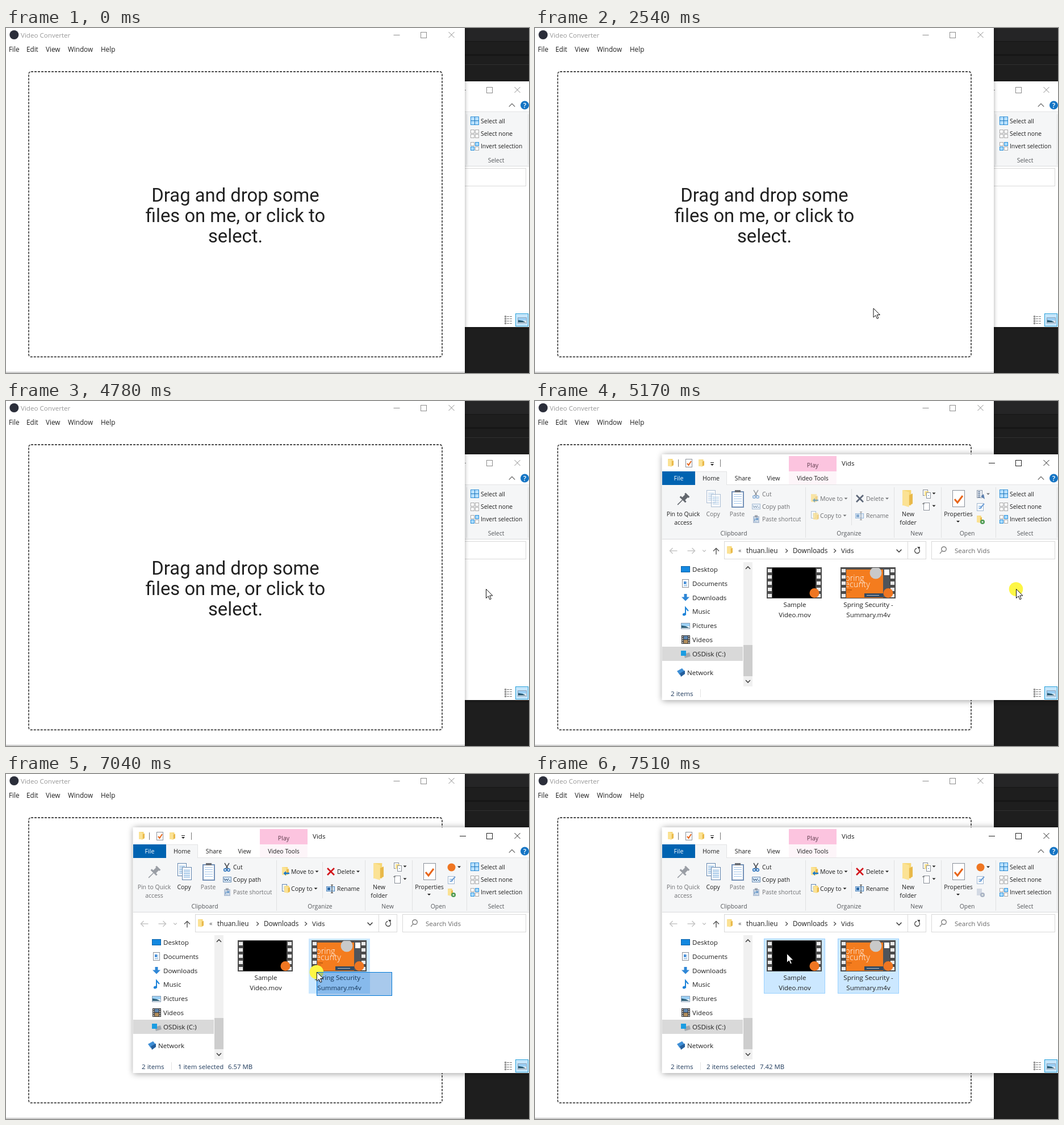
An HTML page with a canvas for the animation above (8 s loop, 921 by 608 pixels).

```html
<!DOCTYPE html>
<html lang="en">
<head>
<meta charset="utf-8">
<title>Video Converter</title>
<style>
html, body { margin: 0; width: 100%; height: 100%; overflow: hidden; background: #1e1e1e; }
canvas { display: block; width: 921px; height: 608px; }
</style>
</head>
<body>
<canvas id="stage" width="921" height="608"></canvas>
<script>
const stage = document.getElementById('stage').getContext('2d');
let c = stage;
const LOOP = 8000;
const UI = '"Open Sans", "Noto Sans", sans-serif';
const INK = '#1f1f1f', DIM = '#6f7073', BLUE = '#0078d7';

// ---------- drawing helpers ----------
function box(x, y, w, h, fill, edge) {
  if (fill) { c.fillStyle = fill; c.fillRect(x, y, w, h); }
  if (edge) { c.strokeStyle = edge; c.lineWidth = 1; c.strokeRect(x + .5, y + .5, w - 1, h - 1); }
}
function disc(x, y, r, fill) {
  c.fillStyle = fill; c.beginPath(); c.arc(x, y, r, 0, 7); c.fill();
}
function path(pts, x = 0, y = 0) {
  c.beginPath();
  for (let i = 0; i < pts.length; i += 2) c.lineTo(x + pts[i], y + pts[i + 1]);
}
function line(color, width, ...pts) {
  path(pts); c.strokeStyle = color; c.lineWidth = width; c.stroke();
}
function poly(color, ...pts) {
  path(pts); c.fillStyle = color; c.fill();
}
function text(s, x, y, size = 10.3, color = INK, align = 'left', font = UI, weight = 400) {
  c.font = `${weight} ${size}px ${font}`;
  c.textAlign = align; c.fillStyle = color; c.fillText(s, x, y);
}
const mid = (s, x, y, size, color) => text(s, x, y, size, color, 'center');
const caret = (x, y, color = INK) => poly(color, x - 3, y - 1.5, x + 3, y - 1.5, x, y + 1.5);
function chevron(x, y, dx, dy, color, w = 1.3) {
  line(color, w, x - dx - 2 * dy, y - dy - 2 * dx, x + dx, y + dy, x - dx + 2 * dy, y - dy + 2 * dx);
}
function faded(on, draw) {
  c.save(); if (!on) c.globalAlpha = .5;
  draw(); c.restore();
}
function folder(x, y, w, h) {
  box(x, y, w * .85, h * .9, '#f7d774');
  poly('#e9b94a', x + w * .65, y + h * .3, x + w, y + h * .2, x + w, y + h * .8, x + w * .65, y + h * .9);
  poly('#fbe294', x, y, x + w * .65, y + h * .12, x + w * .65, y + h, x, y + h * .88);
}
function page(x, y, w, h, rows = 0, edge = '#8a9099') {
  box(x, y, w, h, '#fff', edge);
  for (let i = 0; i < rows; i++) box(x + 3, y + 5 + i * 3, w - 6, 1, '#5b9bd5');
}
function controls(y, [a, b, d], color) {
  line(color, 1, a - 5.5, y + .5, a + 5.5, y + .5);
  box(b - 5, y - 5, 11, 11, null, color);
  line(color, 1, d - 5, y - 5, d + 5, y + 5);
  line(color, 1, d + 5, y - 5, d - 5, y + 5);
}
function windowBox(x, y, w, h, blur, alpha) {
  c.save(); c.shadowColor = `rgba(0,0,0,${alpha})`; c.shadowBlur = blur; c.shadowOffsetY = 1;
  box(x, y, w, h, '#fff'); c.restore();
}

// ---------- converter window ----------
function desktop() {
  box(0, 0, 921, 608, '#1e1e1e');
  box(808, 0, 113, 23, '#252526');
  box(808, 23, 113, 1, '#151515');
  box(808, 46, 113, 3, '#161616');
  box(808, 64, 113, 1, '#303030');
}
function converter() {
  windowBox(-20, -20, 828, 627, 7, .35);
  box(0, 606, 808, 1, '#b4b4b4');
  box(0, 607, 808, 1, '#e4e4e4');
  disc(14.3, 12, 8, '#2b2e3a');
  text('Video Converter', 26, 17, 11.6, '#989898');
  controls(12, [688, 735, 784.5], '#8d8d8d');
  [['File', 5], ['Edit', 36], ['View', 70], ['Window', 109], ['Help', 167]]
    .forEach(([s, x]) => text(s, x, 42, 11.7));
  c.save();
  c.strokeStyle = '#4c4c4c'; c.lineWidth = 1.8; c.setLineDash([4, 2]);
  c.beginPath(); c.roundRect(40, 77, 728, 502.5, 4); c.stroke();
  c.restore();
  ['Drag and drop some', 'files on me, or click to', 'select.']
    .forEach((s, i) => text(s, 404, 305.5 + i * 36, 32.8, '#212121', 'center', 'Roboto, sans-serif'));
}

// ---------- ribbon ----------
function quickBar() {
  folder(234, 102, 10, 14);
  box(252, 103, 1, 13, '#777');
  page(265, 102, 12, 15);
  line('#e8651a', 2, 268, 110, 270.5, 113, 275, 106);
  folder(288, 103, 10, 13);
  box(309, 108, 6, 1, INK); caret(312, 112.5);
  box(326, 103, 1, 13, '#777');
}
function clipboardIcon(x, y, w, h) {
  box(x, y + 2, w, h - 2, '#7592b8');
  box(x + 2, y + 4, w - 4, h - 6, '#fff');
  box(x + w * .27, y, w * .46, 4, '#6b6f76');
  for (let i = 0; i < Math.floor(h / 6); i++) box(x + 4, y + 7 + i * 4, w - 8, 1, '#9fc3e8');
}
function clipboardGroup(sel) {
  const on = sel ? INK : DIM, off = sel ? DIM : INK;
  const steel = sel ? '#9a9ea5' : '#63676e';
  c.save(); c.translate(261, 173); c.rotate(Math.PI / 4);
  box(-5, -11, 10, 3, steel); box(-3.5, -9, 7, 9, steel); box(-7, -1, 14, 3, steel);
  line(steel, 1.5, 0, 2, 0, 14);
  c.restore();
  mid('Pin to Quick', 261, 203, 10.5, off); mid('access', 261, 217.5, 10.5, off);
  faded(sel, () => { page(302, 157, 16, 23, 5, '#5f83ad'); page(310, 164, 17, 23, 5, '#5f83ad'); });
  mid('Copy', 313.5, 203, 10.4, on);
  clipboardIcon(346, 157, 22, 31);
  mid('Paste', 356, 203, 10.4, DIM);
  faded(sel, () => {
    line('#4a4f57', 1.5, 385, 157, 391, 167); line('#4a4f57', 1.5, 393, 157, 387, 167);
    c.strokeStyle = '#2a72bd'; c.lineWidth = 1.6;
    for (const x of [386, 392]) { c.beginPath(); c.arc(x, 169, 2.3, 0, 7); c.stroke(); }
    box(382, 181, 15, 10, '#d7e8f8', '#6f8fb3');
    line('#24466d', 1, 384, 184, 386, 188, 388, 185, 390, 188, 392, 184);
    box(393, 187, 2, 1, '#24466d');
  });
  text('Cut', 400, 168, 10.4, on);
  text('Copy path', 400, 190, 10.4, on);
  faded(false, () => {
    clipboardIcon(384, 201, 11, 14);
    line('#1664b0', 1.5, 387, 212, 387, 208, 392, 208); poly('#1664b0', 390, 205, 394, 208, 390, 211);
  });
  text('Paste shortcut', 400, 212, 10.2, DIM);
}
function organizeGroup(sel) {
  const on = sel ? INK : DIM;
  faded(sel, () => {
    folder(486, 164, 12, 15);
    line('#1979ca', 2.5, 499, 175, 492, 175); poly('#1979ca', 493, 171, 488.5, 175, 493, 179);
    page(486, 194, 9, 13, 2, '#5f83ad'); folder(490, 197, 10, 13);
  });
  text('Move to', 502, 176, 10.6, on); caret(547.5, 172, on);
  text('Copy to', 502, 206, 10.6, on); caret(545.5, 202, on);
  const x = sel ? '#d3131b' : '#5d6778';
  line(x, 2.6, 566, 166, 578, 178); line(x, 2.6, 578, 166, 566, 178);
  text('Delete', 583, 176, 10.4, on); caret(620, 172, on);
  faded(sel, () => {
    box(564, 198, 15, 9, '#cfe4f7', '#4b83bd'); box(566, 200, 5, 5, '#2c6aa8');
    line('#333', 1, 572, 195.5, 576, 195.5); line('#333', 1, 574, 196, 574, 209); line('#333', 1, 572, 209.5, 576, 209.5);
  });
  text('Rename', 583, 206, 10.4, on);
}
function newGroup() {
  folder(647, 157, 18, 30);
  mid('New', 657, 203, 10.6); mid('folder', 657, 217.5, 10.6);
  page(683, 156, 9, 11); folder(686, 159, 8, 9); page(689, 161, 8, 11, 1);
  caret(702.5, 163);
  page(684, 179, 11, 14); line('#555', 1, 682, 181, 686, 181);
  caret(702.5, 185);
}
function openGroup(sel) {
  page(735, 157, 22, 30);
  line('#e8651a', 3, 739, 173, 744, 179, 753, 167);
  mid('Properties', 745.5, 203, 10.5); caret(745, 212.5);
  if (sel) disc(784.5, 164.5, 7, '#ef7622');
  else {
    box(778, 157, 10, 14, '#eef1f5', '#8b97a8');
    for (let i = 0; i < 4; i++) box(780, 159 + i * 3, 4, 2, '#7f93ad');
    poly('#5b7fae', 785, 168, 790, 164, 792, 173);
  }
  caret(798, 164, sel ? INK : DIM);
  page(778, 180, 12, 14, 2, '#9fb6d0'); line('#6f9fd6', 2, 783, 190, 791, 181);
  const grey = sel > 1;
  if (grey) box(778, 202, 9, 12, '#d3d9e4'); else folder(778, 202, 9, 13);
  disc(788, 213, 4, grey ? '#a9b3c4' : '#4d9b53'); disc(788, 213, 1.5, '#e8eee8');
}
function grid(x, y, marks) {
  for (let i = 0; i < 4; i++) {
    const on = marks[i] === '1';
    box(x + i % 2 * 8, y + (i >> 1) * 8, 7, 7, on ? '#a9dcff' : '#fff', on ? '#2b8fd9' : '#a8a8a8');
  }
}
function selectGroup() {
  box(818, 156, 15, 15, '#b9e1ff', '#2b8fd9');
  box(825, 156, 1, 15, '#1c77bd'); box(818, 163, 15, 1, '#1c77bd');
  grid(818, 179, '0000');
  grid(818, 201, '0110');
  text('Select all', 836, 168, 10.5);
  text('Select none', 836, 190, 10.4);
  text('Invert selection', 836, 212, 10.3);
}
function ribbon(sel) {
  box(447, 97, 84, 51, '#fdf5f9'); box(447, 97, 84, 27, '#fcc4df');
  mid('Play', 489, 116.5, 10.6, '#5c3a4b'); mid('Video Tools', 489, 140, 10.5);
  text('Vids', 540, 114, 11.6);
  box(224, 148, 697, 96, '#f5f6f7');
  box(224, 147, 697, 1, '#e3e4e5'); box(224, 243, 697, 1, '#dadbdc');
  box(224, 124, 58, 24, '#0063b1');
  box(282, 124, 56, 25, '#f5f6f7');
  box(282, 124, 56, 1, '#e3e4e5'); box(337, 124, 1, 24, '#e3e4e5');
  mid('File', 253, 140, 10.6, '#fff'); mid('Home', 310, 140, 10.6);
  mid('Share', 366, 140, 10.6); mid('View', 420, 140, 10.6);
  chevron(891, 136, 0, -2.6, '#666');
  disc(913.5, 136, 7.5, '#1474c4');
  text('?', 913.5, 140.5, 12, '#fff', 'center', UI, 600);
  for (const x of [476, 632, 715, 811, 919]) box(x, 152, 1, 89, '#e0e1e2');
  box(557, 155, 1, 64, '#e0e1e2');
  [['Clipboard', 350], ['Organize', 553], ['New', 672], ['Open', 761], ['Select', 863]]
    .forEach(([s, x]) => mid(s, x, 237, 10.4, '#54575b'));
  quickBar(); clipboardGroup(sel); organizeGroup(sel); newGroup(); openGroup(sel); selectGroup();
}

// ---------- explorer body ----------
function arrow(x, y, dx, dy, color) {
  const s = dy ? 5.5 : 6.5, k = 5, ax = x + dx * s, ay = y + dy * s;
  line(color, 1.4, x - dx * s, y - dy * s, ax, ay);
  line(color, 1.4, ax - k * (dx + dy), ay - k * (dy + dx), ax, ay, ax - k * (dx - dy), ay - k * (dy - dx));
}
function addressBar() {
  arrow(244, 264, -1, 0, '#c2c2c2'); arrow(275, 264, 1, 0, '#c2c2c2');
  chevron(298, 264, 0, 1.4, '#bbb'); arrow(319, 265, 0, -1, '#555');
  box(333, 247, 356, 32, '#fff', '#d9d9d9'); box(656, 247, 1, 32, '#d9d9d9');
  folder(338, 256, 10, 14);
  text('«', 358, 267, 11, '#555');
  text('thuan.lieu', 372, 267.5, 11.8); chevron(443, 264, 1.7, 0, '#444');
  text('Downloads', 454, 267.5, 11.8); chevron(528, 264, 1.7, 0, '#444');
  text('Vids', 539, 267.5, 11.6);
  chevron(641, 264, 0, 2.2, '#333', 1.5);
  c.strokeStyle = '#444'; c.lineWidth = 1.4; c.beginPath(); c.arc(673, 264, 4.3, -.6, 4.5); c.stroke();
  poly('#444', 673, 257, 678, 257, 677, 262);
  box(698, 247, 218, 32, '#fff', '#d9d9d9');
  c.strokeStyle = '#666'; c.lineWidth = 1.2; c.beginPath(); c.arc(720, 261, 4.2, 0, 7); c.stroke();
  line('#666', 1.2, 717, 264, 713, 269);
  text('Search Vids', 739, 268, 11.6, '#6b6b6b');
}
function picture(x, y, w, h) {
  box(x, y, w, h, '#fff', '#8aa0b8');
  box(x + 1, y + 1, w - 2, h * .45, '#9cd0f5');
  poly('#2f6079', x + 1, y + h * .4, x + w * .55, y + h * .55, x + w - 1, y + h - 2, x + 1, y + h - 2);
}
function navPane() {
  box(224, 433, 142, 25, '#d9d9d9');
  ['Desktop', 'Documents', 'Downloads', 'Music', 'Pictures', 'Videos', 'OSDisk (C:)']
    .forEach((s, i) => text(s, 277, 301.2 + i * 24.75, 11.6));
  text('Network', 268, 482.5, 11.6);
  box(257, 291, 16, 11, '#1488e0', '#0d62a8');
  page(259, 314, 12, 15, 3); box(262, 318, 4, 4, '#4a90d9');
  box(262.5, 340, 5, 6, '#2f87d6'); poly('#2f87d6', 258, 345.5, 272, 345.5, 265, 352.5);
  line('#1d83d8', 2, 265, 377, 265, 364, 270, 370);
  c.fillStyle = '#1d83d8'; c.beginPath(); c.ellipse(263, 376, 3.2, 2.3, -.3, 0, 7); c.fill();
  picture(257, 391, 16, 11);
  box(258, 413, 15, 15, '#333');
  box(262, 414, 7, 6, '#5e86b0'); box(262, 421, 7, 6, '#b28e5d');
  for (let i = 0; i < 4; i++) for (const x of [259, 270]) box(x, 414.5 + i * 3.5, 2, 2, '#ddd');
  poly('#a3a8ae', 262, 446, 272, 443, 274, 450, 264, 453); box(257, 440, 9, 9, '#1b9de2');
  poly('#3f8fd6', 250, 476, 259, 471, 264, 477, 255, 483); poly('#255f9c', 255, 480, 264, 475, 264, 481, 257, 486);
  box(367, 284, 16, 219, '#f0f0f0'); box(367, 430, 16, 55, '#cdcdcd');
  chevron(375, 294, 0, -2, '#444', 1.6); chevron(375, 494, 0, 2, '#444', 1.6);
}
function film(x, y, draw) {
  box(x, y, 97, 55, '#4b4b4b');
  for (let i = 0; i < 5; i++) for (const dx of [2, 88]) box(x + dx, y + 3 + i * 11, 7, 6, '#e9e9e9');
  c.save(); c.beginPath(); c.rect(x + 10, y + 1, 76, 53); c.clip(); draw(); c.restore();
  disc(x + 84, y + 45.5, 8.5, '#ef7622');
}
function slide() {
  box(548, 294, 76, 53, '#f47c1e');
  box(548, 294, 76, 3, '#55504c');
  box(613, 294, 11, 53, '#50545a'); box(615, 297, 9, 10, '#fff');
  text('pring', 546, 317, 14.5, '#fff', 'left', UI, 300);
  text('ecurity', 546, 328, 14.5, '#fff', 'left', UI, 300);
  box(549, 332, 9, 2, '#c85f10'); box(549, 336, 6, 1, '#c85f10');
  box(580, 339, 33, 7, '#34495f'); box(584, 342, 22, 1, '#b8c5d2');
  disc(600, 303, 10.5, '#c9c9c9');
}
function files(sel, dragging) {
  [sel > 1, sel > 0].forEach((on, i) => {
    if (on) box(403 + i * 130, 290, 108, 97, '#cce8ff', dragging ? null : '#99d1ff');
  });
  film(408, 293, () => box(418, 294, 76, 53, '#000'));
  film(538, 293, slide);
  mid('Sample', 457.5, 363, 11.5); mid('Video.mov', 457.5, 380.5, 11.5);
  mid('Spring Security -', 587, 363, 11.6); mid('Summary.m4v', 587, 380.5, 11.5);
}
function statusBar(sel) {
  const navy = '#1e395b';
  text('2 items', 239, 520, 11.6, navy);
  box(291, 508, 1, 14, '#e3e3e3');
  if (sel === 1) { text('1 item selected', 303, 520, 11.4, navy); text('6.57 MB', 391, 520, 11.4, navy); }
  if (sel === 2) { text('2 items selected', 302, 520, 11.4, navy); text('7.42 MB', 396, 520, 11.4, navy); }
  for (let i = 0; i < 4; i++) {
    box(878, 507 + i * 4, 3, 3, null, '#777');
    box(882, 508 + i * 4, 4, 1, '#777'); box(887, 508 + i * 4, 4, 1, '#777');
  }
  box(897, 503, 23, 23, '#c5e6fb', '#26a0da');
  picture(901, 510, 16, 11);
}
function explorer(sel, front, dragging) {
  windowBox(223.5, 94, 760, 433, front ? 11 : 6, .4);
  ribbon(sel);
  controls(109, [804.5, 851, 900.5], front ? '#222' : '#8a8a8a');
  addressBar(); navPane(); files(sel, dragging); statusBar(sel);
}

// Each still scene is painted once and kept.
const scenes = {};
function scene(front, sel, dragging) {
  const key = [front, sel, dragging].join();
  if (!scenes[key]) {
    const layer = document.createElement('canvas');
    layer.width = 921; layer.height = 608;
    c = layer.getContext('2d');
    desktop();
    if (front) converter();
    explorer(sel, front, dragging);
    if (!front) converter();
    c = stage;
    scenes[key] = layer;
  }
  return scenes[key];
}

// ---------- pointer ----------
// start, end, steps, from, to, easing
const smooth = u => u * u * (3 - 2 * u);
const settle = u => 1 - (1 - u) ** 2.23;
const moves = [
  [1280, 1830, 8, [812, 597], [596, 494], smooth],
  [2540, 3300, 11, [595.5, 493.5], [540, 324.5], smooth],
  [3380, 3460, 2, [537, 324.5], [534, 324.5], smooth],
  [3940, 4700, 11, [558, 319], [842, 331], smooth],
  [4780, 4860, 2, [845, 331], [847, 331], smooth],
  [5640, 6250, 9, [843, 332], [680, 390], smooth],
  [6740, 7510, 11, [673, 388], [443, 316], settle]
];
function pointerAt(t) {
  const m = moves.filter(m => t >= m[0]).pop();
  if (!m) return null;
  const [t0, t1, n, a, b, ease] = m;
  const k = Math.min(n - 1, Math.floor((t - t0) / (t1 - t0) * (n - 1) + .02));
  const u = ease(k / (n - 1));
  return [a[0] + (b[0] - a[0]) * u, a[1] + (b[1] - a[1]) * u];
}
function pointer(x, y, beam) {
  if (beam) {
    for (const [color, w] of [['#fff', 3], ['#111', 1.4]]) {
      line(color, w, x, y - 8, x, y + 8);
      for (const dy of [-8, 8]) line(color, w, x - 3.5, y + dy, x + 3.5, y + dy);
    }
    return;
  }
  path([0, 0, 0, 16, 3.8, 12.4, 6.4, 18.3, 8.8, 17.2, 6.3, 11.5, 11.4, 11.5], x + .5, y + .5);
  c.closePath(); c.fillStyle = '#fff'; c.fill();
  c.strokeStyle = '#111'; c.lineWidth = 1; c.stroke();
}

let shown = '';
function draw(t) {
  const front = t >= 5170, dragging = t >= 6740 && t < 7510;
  const pressed = (t >= 5170 && t < 5390) || (t >= 6420 && t < 7510);
  const p = pointerAt(t);
  const sel = t < 6740 ? 0 : p[0] < 511 ? 2 : p[0] < 641 ? 1 : 0;
  const state = [front, dragging, pressed, sel, p].join();
  if (state === shown) return;
  shown = state;
  c.drawImage(scene(front, sel, dragging), 0, 0);
  if (!p) return;
  const [x, y] = p;
  if (pressed) disc(x, y + .5, 12.3, '#fdf645');
  if (dragging) {
    const left = Math.round(x), top = Math.round(y);
    box(left, top, 680 - left, 391 - top, 'rgba(0,96,200,.34)', BLUE);
  }
  pointer(x, y, !front && x > 244 && x < 564 && y > 276 && y < 386);
}
function tick(now) {
  draw(now % LOOP);
  requestAnimationFrame(tick);
}
requestAnimationFrame(tick);
</script>
</body>
</html>
```
